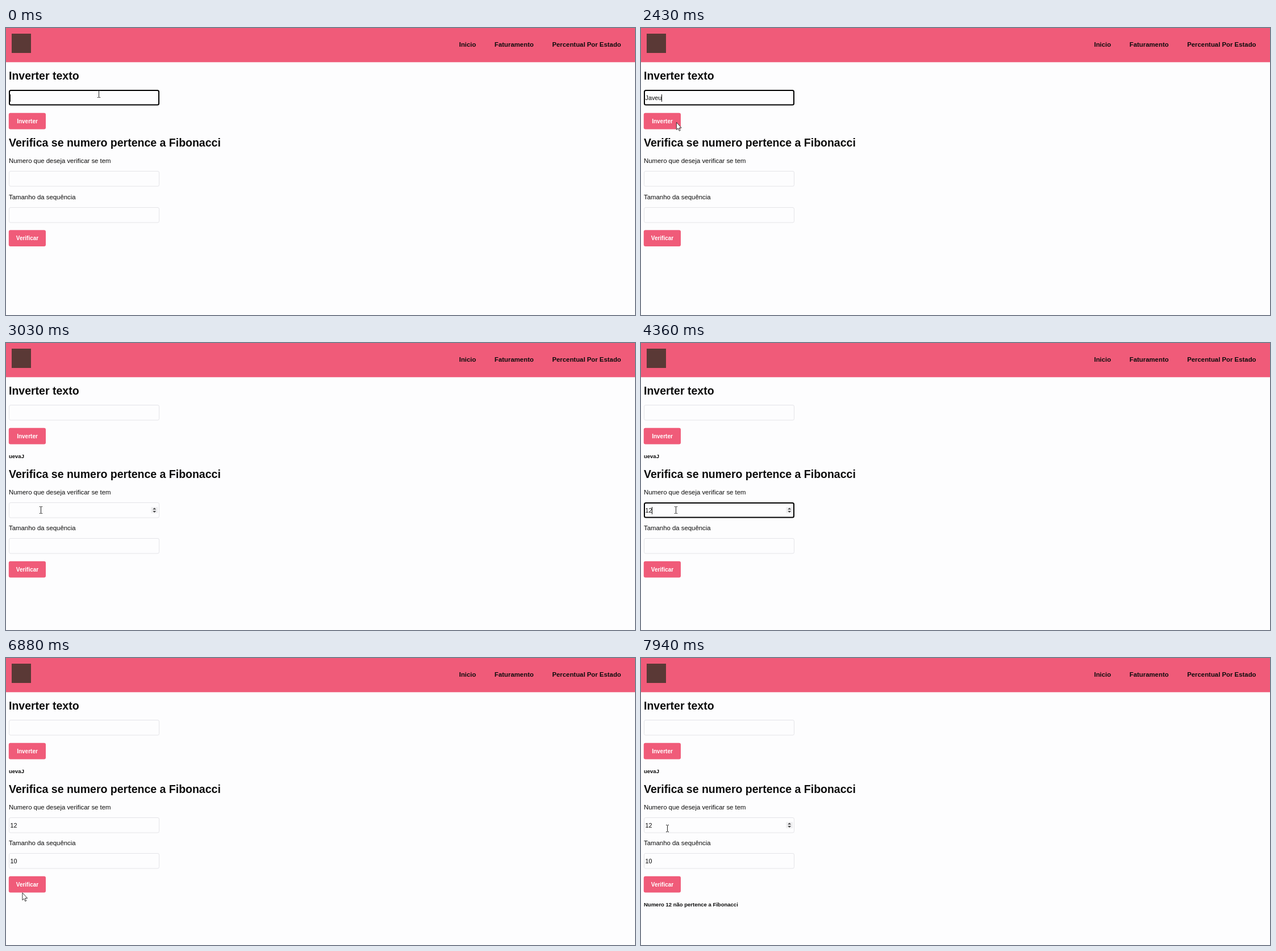
Animation of 1107 by 506 pixels, one loop 7990 ms. Source, as an HTML page with a canvas:

```html
<!DOCTYPE html>
<html lang="pt-BR">
<head>
<meta charset="utf-8">
<title>Inverter texto</title>
<style>
html, body { margin: 0; width: 100%; height: 100%; overflow: hidden; background: #fdfdfe; }
canvas { display: block; }
</style>
</head>
<body>
<canvas id="stage" width="1107" height="506"></canvas>
<script>
const ctx = document.getElementById('stage').getContext('2d');
const LOOP = 7990, BLINK = 530;
const PINK = '#f05b79', PAGE = '#fdfdfe', INK = '#0c0c0c';
const FAMILY = '"Liberation Sans", Arial, sans-serif';

// Page laid out in CSS pixels at this zoom
const ZOOM = 0.8133;
const H2 = 24 * ZOOM, BODY = 14 * ZOOM, INPUT = 13.33 * ZOOM, SMALL = 11.7 * ZOOM, BUTTON = 12.3 * ZOOM;
const LEFT = 5, FIELD_W = 265, FIELD_H = 27.5, ROW = 63.5, RESULT_H = 28.6;

const NAME = 'Javeu';
const REVERSED = [...NAME].reverse().join('');
const INVERTED = 2600, CHECKED = 7260;

const nameField = { text: NAME, first: 650, last: 1320, focus: -230, blur: INVERTED, reset: true };
const numberField = { text: '12', first: 4190, last: 4330, focus: 3230, blur: 4890, number: true };
const sizeField = { text: '10', first: 5850, last: 5940, focus: 4890, blur: 6720, number: true };

const start = { x: 163, y: 116 };
const moves = [
  { from: 2050, to: 2400, x: 62, y: 166 },
  { from: 2640, to: 3020, x: 61, y: 294 },
  { from: 4450, to: 4880, x: 63, y: 361 },
  { from: 6410, to: 6860, x: 28.5, y: 413.5 },
  { from: 6960, to: 7200, x: 34, y: 398 },
  { from: 7300, to: 7920, x: 46, y: 300 }
];

const arrow = new Path2D('M.4 .4V13.4L3.2 10.8L5.3 15.4L7.2 14.6L5.2 10H9.2Z');

const progress = (t, from, to) => Math.min(1, Math.max(0, (t - from) / (to - from)));
const ease = u => u * u * (3 - 2 * u);

function mouseAt(t) {
  return moves.reduce((p, m) => {
    const e = ease(progress(t, m.from, m.to));
    return { x: p.x + (m.x - p.x) * e, y: p.y + (m.y - p.y) * e };
  }, start);
}

// Typing speeds up towards the last letter
function typedCount(f, t) {
  if (t < f.first) return 0;
  return 1 + Math.floor((f.text.length - 1) * progress(t, f.first, f.last) ** 2);
}

function text(str, x, y, size, weight = 'bold', color = INK) {
  ctx.font = `${weight} ${size}px ${FAMILY}`;
  ctx.fillStyle = color;
  ctx.fillText(str, x, y);
  return ctx.measureText(str).width;
}

function box(x, y, w, h, r) {
  ctx.beginPath();
  ctx.roundRect(x, y, w, h, r);
}

function header() {
  ctx.fillStyle = PINK;
  ctx.fillRect(0, 0, 1107, 60.3);
  ctx.fillStyle = '#5a3936';
  ctx.fillRect(10, 10, 34, 34);
  let x = 797.5;
  for (const item of ['Inicio', 'Faturamento', 'Percentual Por Estado']) {
    x += text(item, x, 33.4, BODY) + 40 * ZOOM;
  }
}

function button(label, y) {
  ctx.fillStyle = PINK;
  box(LEFT - 0.2, y - 0.2, 65.2, 28.7, 3);
  ctx.fill();
  ctx.textAlign = 'center';
  text(label, LEFT + 32.5, y + 17.6, BUTTON, 'bold', '#fff');
  ctx.textAlign = 'left';
}

function spinner(y) {
  const x = 261.2;
  ctx.fillStyle = '#efeff1';
  ctx.fillRect(x - 6, y - 5.5, 12, 11);
  ctx.fillStyle = '#444';
  for (const s of [-1, 1]) {
    ctx.beginPath();
    ctx.moveTo(x - 3, y + s * 1.2);
    ctx.lineTo(x + 3, y + s * 1.2);
    ctx.lineTo(x, y + s * 4.2);
    ctx.fill();
  }
}

// Draws an input and tells whether the mouse is over it
function field(f, top, t, mouse) {
  const y = Math.round(top);
  const focused = t >= f.focus && t < f.blur;
  const hovered = mouse.x >= LEFT && mouse.x < LEFT + FIELD_W && mouse.y >= y && mouse.y < y + FIELD_H;
  const line = focused ? 2 : 1;
  box(LEFT + line / 2, y + line / 2, FIELD_W - line, FIELD_H - line, 2.5);
  ctx.lineWidth = line;
  ctx.strokeStyle = focused ? '#000' : '#e4e4e8';
  ctx.stroke();

  const count = f.reset && t >= f.blur ? 0 : typedCount(f, t);
  const width = text(f.text.slice(0, count), LEFT + 2.5, y + 17.8, INPUT, 'normal');
  if (focused) {
    const since = count === f.text.length ? f.last : count ? f.first : f.focus;
    if ((t - since) % (2 * BLINK) < BLINK) ctx.fillRect(Math.round(LEFT + 2 + width), y + 8, 1, 13);
  }
  if (f.number && (focused || hovered)) spinner(y + 13.7);
  return hovered;
}

function label(str, fieldTop) {
  text(str, LEFT, Math.round(fieldTop - 14.2), BODY, 'normal');
}

function cursor({ x, y }, beam) {
  ctx.save();
  if (beam) {
    ctx.translate(Math.round(x), Math.round(y));
    ctx.fillStyle = '#222';
    ctx.fillRect(0, -5, 1, 11);
    for (const end of [-6, 6]) {
      ctx.fillRect(-2, end, 2, 1);
      ctx.fillRect(1, end, 2, 1);
    }
  } else {
    ctx.translate(x, y);
    ctx.fillStyle = '#fff';
    ctx.fill(arrow);
    ctx.lineWidth = 0.9;
    ctx.strokeStyle = '#222';
    ctx.stroke(arrow);
  }
  ctx.restore();
}

function draw(t) {
  const mouse = mouseAt(t);
  const nameTop = 109.3;
  const numberTop = 252.3 + (t >= INVERTED ? RESULT_H : 0);
  const sizeTop = numberTop + ROW;

  ctx.fillStyle = PAGE;
  ctx.fillRect(0, 0, 1107, 506);
  header();

  text('Inverter texto', LEFT, Math.round(nameTop - 18.3), H2);
  button('Inverter', nameTop + 40.6);
  if (t >= INVERTED) text(REVERSED, LEFT, 203, SMALL);

  text('Verifica se numero pertence a Fibonacci', LEFT, Math.round(numberTop - 43.3), H2);
  label('Numero que deseja verificar se tem', numberTop);
  label('Tamanho da sequência', sizeTop);
  button('Verificar', sizeTop + 40.6);
  if (t >= CHECKED) text('Numero 12 não pertence a Fibonacci', LEFT, 438, SMALL);

  const hovers = [
    field(nameField, nameTop, t, mouse),
    field(numberField, numberTop, t, mouse),
    field(sizeField, sizeTop, t, mouse)
  ];
  cursor(mouse, hovers.includes(true));
}

function frame() {
  draw(performance.now() % LOOP);
  requestAnimationFrame(frame);
}
frame();
</script>
</body>
</html>
```
